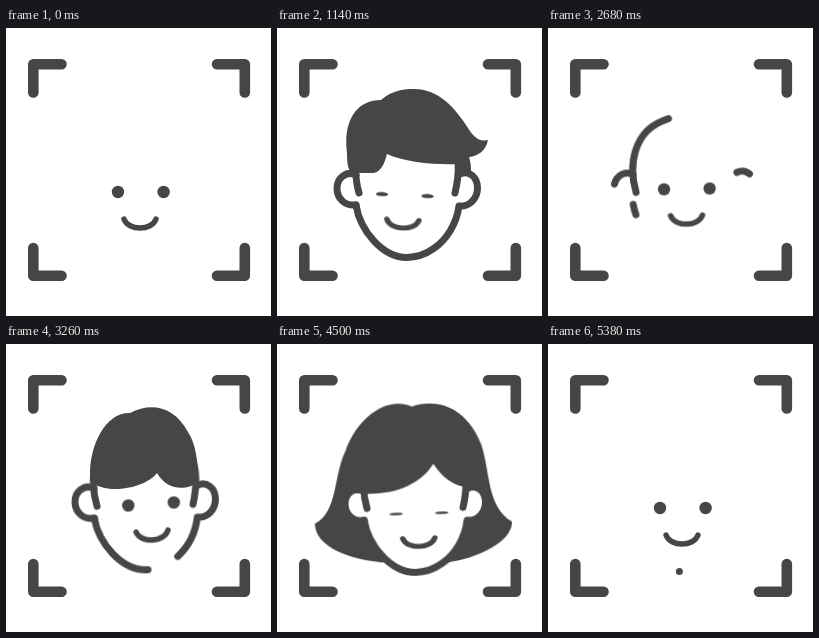
Animation, 265 px wide and 288 px high, one loop 5400 ms. Source, as an HTML page:

```html
<!DOCTYPE html>
<html lang="en">
<head>
<meta charset="utf-8">
<title>Face scan</title>
<style>
html, body { margin: 0; width: 100%; height: 100%; overflow: hidden; background: #fff; }
svg { display: block; width: 100vw; height: 100vh; }
svg * { animation: 5.4s ease-in-out infinite; }

.frame, .line { fill: none; stroke: #464646; stroke-linecap: round; stroke-linejoin: round; }
.frame { stroke-width: 10.6; }
.line { stroke-width: 7; }
.smile { stroke-width: 5.5; }
.dark { fill: #464646; }
.skin { fill: #fff; }

.head { transform-origin: 134px 160px; animation-name: head; }
.face { transform-origin: 135px 175px; animation-name: face; }
.eye { transform-box: fill-box; transform-origin: center; animation-name: blink; }
.skull { animation-name: skull, show; animation-timing-function: ease-in-out, step-end; }
.ear { animation-name: ear, show; animation-timing-function: ease-in-out, step-end; }
.jaw { animation-name: jaw, show-jaw; animation-timing-function: ease-in-out, step-end; }
.quiff { transform-origin: 104px 97px; animation-name: quiff; }
.fringe { transform-origin: 140px 105px; animation-name: fringe; }
.bob { transform-origin: 138px 120px; animation-name: bob; }

/* Poses: centre, left, right, centre, with a nod before each change */
@keyframes head {
  0%, 100% { transform: translate(0, 0) rotate(0deg); }
  3%, 11% { transform: translate(0, -3px) rotate(0deg); }
  18.5% { transform: translate(-3px, 3.5px) rotate(0deg); }
  21.1% { transform: translate(-3px, 2px) rotate(0deg); }
  23.3%, 34.1% { transform: translate(-3px, -1px) rotate(0deg); }
  36.9% { transform: translate(-3px, 3px) rotate(0deg); }
  40.4%, 43% { transform: translate(-3px, -1px) rotate(0deg); }
  49% { transform: translate(3px, 1px) rotate(-.6deg); }
  54.4%, 80.4% { transform: translate(6px, -1.7px) rotate(-1.2deg); }
  83.3% { transform: translate(5px, .9px) rotate(-.7deg); }
  85.2% { transform: translate(2.5px, 3px) rotate(0deg); }
  90.4% { transform: translate(0, 1.5px) rotate(0deg); }
}
@keyframes face {
  0%, 9%, 90.4%, 100% { transform: translate(0, 0) rotate(0deg) scale(1, 1); }
  13% { transform: translate(0, -3px) rotate(0deg) scale(1, 1); }
  18.5% { transform: translate(-7px, 4px) rotate(2deg) scale(1, .92); }
  21.1% { transform: translate(-7.5px, 2.2px) rotate(2.5deg) scale(1, .92); }
  23.3%, 34.1% { transform: translate(-7.8px, -2.5px) rotate(3.8deg) scale(1, 1); }
  36.9% { transform: translate(-7.6px, 3px) rotate(3deg) scale(1, .92); }
  40.4%, 43% { transform: translate(-7.8px, -2.2px) rotate(3.8deg) scale(1, .94); }
  54.4%, 80.4% { transform: translate(11px, -4px) rotate(-3.8deg) scale(1, 1); }
  83.3% { transform: translate(7.4px, 4.5px) rotate(-1.6deg) scale(1, .92); }
  85.2% { transform: translate(4px, 5px) rotate(0deg) scale(1, .92); }
}
@keyframes blink {
  0%, 16%, 23.3%, 34.6%, 42.2%, 80.5%, 86.5%, 100% { transform: scale(1); }
  18.5%, 37.5% { transform: scale(1.1, .2); }
  21.1% { transform: scale(1, .37); }
  40.4% { transform: scale(1.05, .5); }
  83%, 83.4% { transform: scale(1.08, .23); }
}

/* Outline strokes, trimmed along a path length of 100 */
@keyframes skull {
  0%, .7% { stroke-dasharray: 0 200; }
  8%, 36.5% { stroke-dasharray: 100 200; }
  40.4% { stroke-dasharray: 48 200; }
  43.5%, 46% { stroke-dasharray: 0 200; }
  54%, 91% { stroke-dasharray: 100 200; }
  97.8%, 100% { stroke-dasharray: 0 200; }
}
@keyframes ear {
  0%, .7% { stroke-dasharray: 0 200; stroke-dashoffset: 0; }
  8%, 37% { stroke-dasharray: 100 200; stroke-dashoffset: 0; }
  40.4% { stroke-dasharray: 52 200; stroke-dashoffset: -45; }
  43.5% { stroke-dasharray: 0 200; stroke-dashoffset: -75; }
  46% { stroke-dasharray: 0 200; stroke-dashoffset: 0; }
  54%, 91% { stroke-dasharray: 100 200; stroke-dashoffset: 0; }
  97.8%, 100% { stroke-dasharray: 0 200; stroke-dashoffset: -75; }
}
@keyframes jaw {
  0%, .7% { stroke-dasharray: 0 100 0 200; stroke-dashoffset: 0; }
  10.5%, 37% { stroke-dasharray: 50 0 50 200; stroke-dashoffset: 0; }
  40.4% { stroke-dasharray: 26.5 0 26.5 200; stroke-dashoffset: -31; }
  43.9% { stroke-dasharray: 0 0 0 200; stroke-dashoffset: -36; }
  46% { stroke-dasharray: 0 100 0 200; stroke-dashoffset: 0; }
  60.4% { stroke-dasharray: 37.5 15.5 47 200; stroke-dashoffset: 0; }
  63%, 91% { stroke-dasharray: 50 0 50 200; stroke-dashoffset: 0; }
  99.6%, 100% { stroke-dasharray: 0 0 0 200; stroke-dashoffset: -36; }
}
@keyframes show {
  0%, 43.5%, 97.8%, 100% { opacity: 0; }
  .7%, 46% { opacity: 1; }
}
@keyframes show-jaw {
  0%, 43.9%, 99.9%, 100% { opacity: 0; }
  .7%, 46% { opacity: 1; }
}

/* Hair */
@keyframes quiff {
  0%, 11% { transform: rotate(66deg) scale(0); }
  16.6% { transform: rotate(-2deg) scale(1.04); }
  19.5%, 34.8% { transform: rotate(0deg) scale(1); }
  40.4% { transform: rotate(66deg) scale(.2); }
  41.9%, 100% { transform: rotate(80deg) scale(0); }
}
@keyframes fringe {
  0%, 54.8%, 90.4%, 100% {
    transform: scale(0);
    d: path("M84 130C84 100 100 68 124 69C145 58 168 62 182 88C190 100 192 117 192 138C182 146 162 148 151 129C140 144 100 152 84 137Z");
  }
  60.4%, 88.1% {
    transform: scale(1);
    d: path("M84 130C84 100 100 68 124 69C145 58 168 62 182 88C190 100 192 117 192 138C182 146 162 148 151 129C140 144 100 152 84 137Z");
  }
  64.8%, 84.4% {
    transform: scale(1);
    d: path("M78 146C70 100 90 60 130 62C150 58 170 62 180 80C194 100 196 125 193 140C180 141 166 131 157 117C145 137 118 151 78 147Z");
  }
}
@keyframes bob {
  0%, 60.4%, 88.6%, 100% { transform: scale(0); }
  60.7%, 88.5% { transform: scale(.5); }
  64.8% { transform: scale(1.01); }
  66.7% { transform: translate(-5px, 0) scale(1.08, 1); }
  70.7%, 84.4% { transform: scale(1); }
}
</style>
</head>
<body>
<svg viewBox="0 0 265 288">
  <path class="frame" d="M55.5 36.3H27.3V64.5M211 36.3H238.8V64.5M27.3 220V247.8H55.5M238.8 220V247.8H211"/>

  <g class="head">
    <g transform="rotate(1.2 134 160) translate(-6 1.7)">
      <path class="dark bob" d="M135 60C160 51 190 60 205 98C214 125 211 160 236 174C238 192 205 212 168 216L105 216C75 213 40 202 39 178C62 166 57 130 69 105C80 72 110 49 135 60Z"/>
    </g>
    <path class="skin" d="M85 163C77 135 82 91 133 87C182 88 190 125 181 163Z"/>
    <path class="skin" d="M82 145C73 140 63 148 63 158C63 169 71 176 82 175C86 200 108 227.5 133 227.5C158 227.5 181 205 185 176C196 177 203.5 168 203.5 158C203.5 147 195 140 186 144Z"/>
    <path class="line skull" pathLength="100" d="M85 163C77 135 82 91 133 87C182 88 190 125 181 163"/>
    <path class="line ear" pathLength="100" d="M82 145C73 140 63 148 63 158C63 169 71 176 82 175"/>
    <path class="line jaw" pathLength="100" d="M82 175C86 200 108 227.5 133 227.5C158 227.5 181 205 185 176C196 177 203.5 168 203.5 158C203.5 147 195 140 186 144"/>
    <g transform="translate(3 -2)">
      <path class="dark quiff" d="M70 125C66 95 78 72 104 72C115 62 128 61 137 61C162 61 178 80 191 100C197 110 203 114 211 112C209 122 202 128 192 129C194 135 194 140 194 146L181 146L182 136C160 137 130 135 110 126C108 134 104 146 94 145L80 145C72 146 70 140 70 125Z"/>
    </g>
    <g transform="rotate(1.2 134 160) translate(-6 1.7)">
      <path class="dark fringe" d="M84 130C84 100 100 68 124 69C145 58 168 62 182 88C190 100 192 117 192 138C182 146 162 148 151 129C140 144 100 152 84 137Z"/>
    </g>
  </g>

  <g class="face">
    <circle class="dark eye" cx="112" cy="164" r="6.2"/>
    <circle class="dark eye" cx="157.6" cy="164" r="6.2"/>
    <path class="line smile" d="M118 191C122 203 146 203 150 191"/>
  </g>
</svg>
</body>
</html>
```
